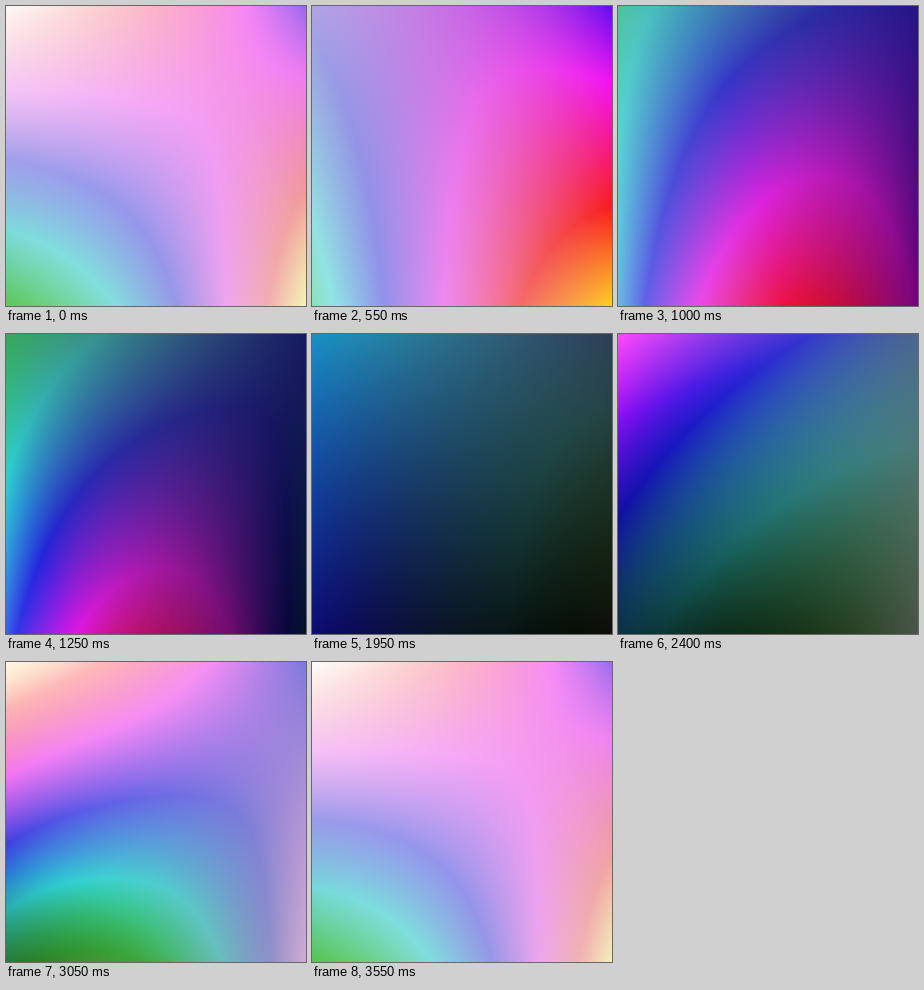
Recreate the animation shown at these times as an HTML page with a canvas. Size 300x300 px, loop 3.6 s.

```html
<!DOCTYPE html>
<html lang="en">
<head>
<meta charset="utf-8">
<title>Colour field</title>
<style>
  html, body { margin: 0; height: 100%; overflow: hidden; }
  canvas { display: block; width: 100vw; height: 100vh; }
</style>
</head>
<body>
<canvas id="stage" width="300" height="300"></canvas>
<script>
const SIZE = 300, LOOP = 3600, STEP = 50;

// A value that swings around its mean once per loop, highest at the angle `peak`.
const wave = (mean, swing, peak) => angle =>
  mean + swing * Math.cos((angle - peak) * Math.PI / 180);

// Hue, saturation and lightness at the left, middle and right of two edges.
const top3 = [
  [wave(270, 135, -43), wave(75, 27, -80), wave(69, 31, -20)],
  [wave(265, 80, -20), wave(68, 25, -30), wave(58, 28, -20)],
  [wave(240, 25, 30), wave(59, 30, 40), wave(45, 25, -25)]
];
const bottom3 = [
  [wave(180, 65, 170), wave(66, 18, 170), wave(44, 28, 62)],
  [wave(228, 115, 95), wave(63, 22, 95), wave(42, 35, 27)],
  [wave(255, 180, 23), wave(53, 46, 65), wave(42, 43, -15)]
];

const ctx = document.getElementById("stage").getContext("2d");
const image = ctx.createImageData(SIZE, SIZE);
const clamp = v => Math.max(0, Math.min(1, v));
const mix = (a, b, t) => a + (b - a) * t;

// Parabola through the three values of an edge.
const bend = (a, b, c, t) =>
  mix(a, c, t) + (4 * b - 2 * a - 2 * c) * t * (1 - t);

function edgeColours(edge, angle) {
  const [left, middle, right] = edge.map(waves => waves.map(w => w(angle)));
  return Array.from({ length: SIZE }, (_, x) =>
    left.map((v, i) => bend(v, middle[i], right[i], x / (SIZE - 1))));
}

function setPixel(offset, hue, sat, light) {
  const chroma = sat * Math.min(light, 1 - light);
  for (let i = 0; i < 3; i++) {
    const k = (hue / 30 + 36 - 4 * i) % 12;
    image.data[offset + i] =
      255 * (light - chroma * Math.max(-1, Math.min(k - 3, 9 - k, 1)));
  }
  image.data[offset + 3] = 255;
}

function draw(time) {
  const angle = time / LOOP * 360;
  const upper = edgeColours(top3, angle);
  const lower = edgeColours(bottom3, angle);
  for (let y = 0; y < SIZE; y++) {
    const t = y / (SIZE - 1);
    for (let x = 0; x < SIZE; x++) {
      const a = upper[x], b = lower[x];
      setPixel((y * SIZE + x) * 4,
        mix(a[0], b[0], t),
        clamp(mix(a[1], b[1], t) / 100),
        clamp(mix(a[2], b[2], t) / 100));
    }
  }
  ctx.putImageData(image, 0, 0);
}

let shown = -1;
function tick() {
  const time = Math.floor(performance.now() % LOOP / STEP) * STEP;
  if (time !== shown) draw(shown = time);
  requestAnimationFrame(tick);
}
tick();
</script>
</body>
</html>
```
